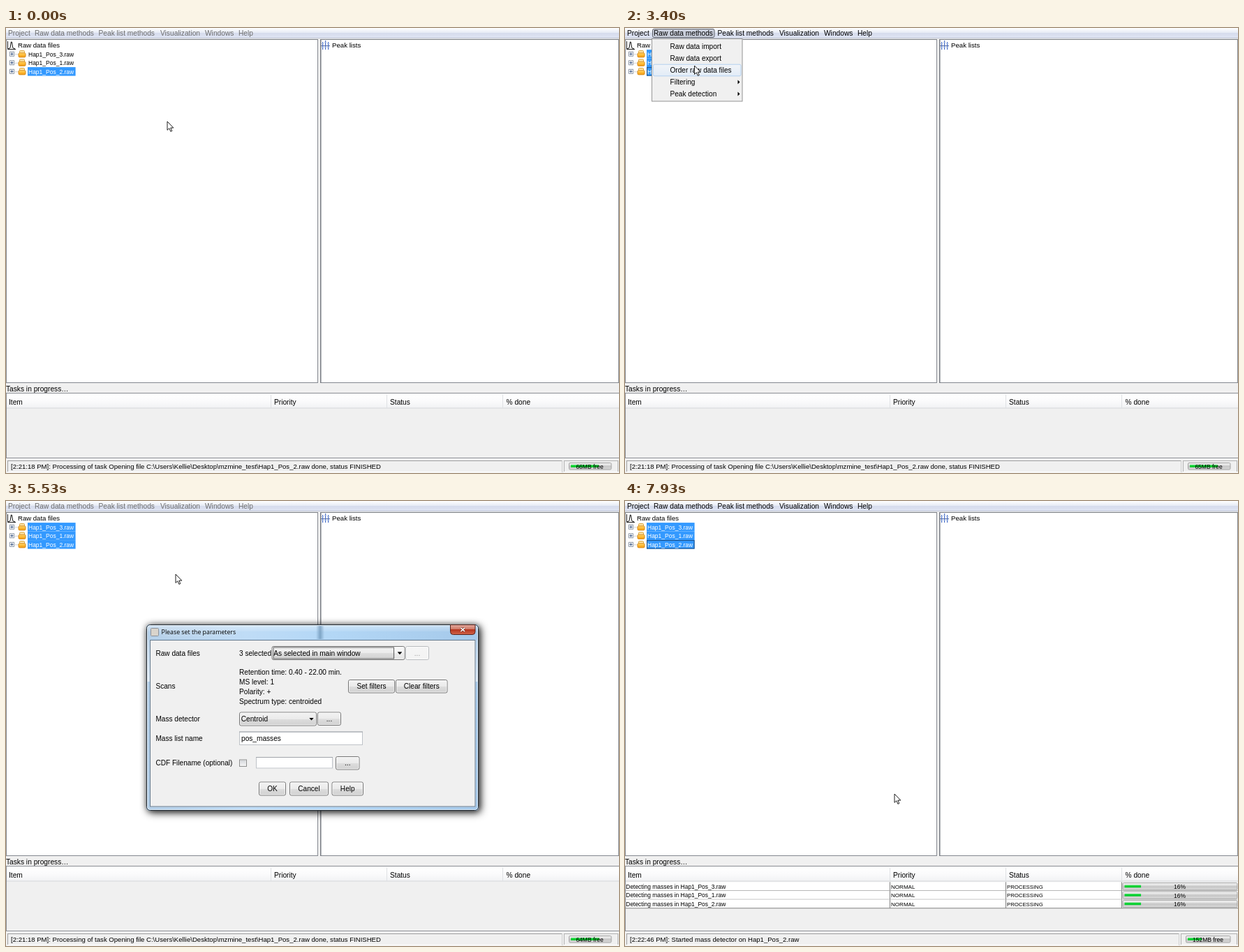
Recreate the animation shown at these times as an HTML page with a canvas. Size 878x638 px, loop 8000 ms.

```html
<!DOCTYPE html>
<html lang="en">
<head>
<meta charset="utf-8">
<title>Mass detection walkthrough</title>
<style>
html, body { margin: 0; width: 100%; height: 100%; overflow: hidden; background: #f0f0f0; }
canvas { display: block; }
</style>
</head>
<body>
<canvas id="stage" width="878" height="638"></canvas>
<script>
const W = 878, H = 638, LOOP = 8000;
const stage = document.getElementById('stage').getContext('2d');
const layer = Object.assign(document.createElement('canvas'), { width: W, height: H });
const layerCtx = layer.getContext('2d');
let c = stage;

const ARIAL = '"Liberation Sans", Arial, sans-serif';
const UI = '"Open Sans", "Noto Sans", sans-serif';
const BIG = 10.2, MID = 9.57, SMALL = 8.5;

// ---------- helpers ----------
function text(s, x, mid, size = BIG, color = '#000', align = 'left', face = ARIAL) {
  c.font = size + 'px ' + face;
  c.textAlign = align;
  c.fillStyle = color;
  c.fillText(s, x, mid + size * 0.355);
}
function box(x, y, x2, y2, color) {
  c.fillStyle = color;
  c.fillRect(x, y, x2 - x, y2 - y);
}
function frame(x, y, x2, y2, color, width = 1) {
  c.strokeStyle = color;
  c.lineWidth = width;
  c.strokeRect(x + 0.5, y + 0.5, x2 - x - 1, y2 - y - 1);
}
function round(x, y, x2, y2, r, fill, stroke) {
  c.beginPath();
  c.roundRect(x, y, x2 - x, y2 - y, r);
  if (fill) { c.fillStyle = fill; c.fill(); }
  if (stroke) { c.strokeStyle = stroke; c.lineWidth = 1; c.stroke(); }
}
function path(points, fill, stroke, width = 1) {
  c.beginPath();
  points.forEach(([x, y]) => c.lineTo(x, y));
  if (fill) { c.closePath(); c.fillStyle = fill; c.fill(); }
  if (stroke) { c.strokeStyle = stroke; c.lineWidth = width; c.stroke(); }
}
function ramp(g, stops) {
  stops.forEach(([at, color]) => g.addColorStop(at, color));
  return g;
}
const shade = (y, y2, ...stops) => ramp(c.createLinearGradient(0, y, 0, y2), stops);
const across = (x, x2, ...stops) => ramp(c.createLinearGradient(x, 0, x2, 0), stops);

// last entry whose time has come
function latest(list, t) {
  return list.filter(e => e[0] <= t).pop()[1];
}

// ---------- timeline ----------
const ACTIVATE = 1000, SELECT_ALL = 1470, MENU = 2130, SUBMENU = 4070,
      CLOSE_MENU = 4870, DIALOG = 4930, PRESS = 7270, RUN = 7330;

const TRAIL = [
  [0, 231, 134], [70, 222, 127], [670, 86, 40], [1000, 86, 38], [1330, 82, 55],
  [1470, 82, 57], [1670, 82, 57], [2000, 84, 7], [2600, 84, 7], [2670, 118, 8],
  [2800, 118, 8], [3200, 105, 36], [3600, 94, 72], [3730, 94, 72], [4000, 90, 87],
  [4270, 90, 87], [4400, 136, 92], [4730, 229, 93], [5270, 229, 93], [5530, 243, 105],
  [5800, 470, 195], [6130, 770, 306], [6400, 610, 326], [6540, 425, 313],
  [6670, 402, 368], [6870, 386, 413], [7870, 386, 413], [7930, 386, 420], [8100, 386, 420]
];
function pointer(t) {
  const i = TRAIL.findIndex(k => k[0] > t);
  const [t0, x0, y0] = TRAIL[i - 1], [t1, x1, y1] = TRAIL[i];
  const k = (t - t0) / (t1 - t0);
  return { x: x0 + (x1 - x0) * k, y: y0 + (y1 - y0) * k };
}

// ---------- main window ----------
const MENUS = [['Project', 3], ['Raw data methods', 41], ['Peak list methods', 132.5],
               ['Visualization', 221], ['Windows', 285], ['Help', 333]];

function menuBar(t, active, p) {
  box(0, 0, W, 15, shade(0, 15, [0, '#fff'], [0.45, '#e6ebf5'], [0.5, '#d6dced'], [1, '#e0e5f4']));
  box(0, 14, W, 15, '#bcc2d0');
  const open = t >= MENU && t < CLOSE_MENU;
  if (open) round(39.5, 1.5, 128, 13.5, 2, '#c9cedb', '#5d6068');
  else if (active && p.y < 14 && p.x > 39 && p.x < 128) round(39.5, 1.5, 128, 13.5, 2, '#eceff7', '#9a9ea8');
  MENUS.forEach(([s, x]) => text(s, x, 7.4, BIG, active ? '#000' : '#6d6d6d'));
}

function folder(y) {
  frame(5, y - 3.5, 12, y + 3.5, '#8f99a8');
  box(6.5, y - 0.5, 10.5, y + 0.5, '#33507f');
  box(8, y - 2, 9, y + 2, '#33507f');
  for (let x = 13; x < 18; x += 2) box(x, y, x + 1, y + 1, '#a8a8a8');
  round(19.5, y - 4.8, 26.5, y, 1, '#fbe3a6', '#d9a441');
  round(18, y - 1.5, 28, y + 4.6, 1.5, shade(y - 2, y + 5, [0, '#ffe08a'], [0.4, '#ffc03c'], [1, '#f0960f']), '#d98c1a');
}

function tree(t, active) {
  box(0, 16, 447, 509, '#fff');
  frame(0, 16, 447, 509, '#84888f');
  box(450, 16, W, 509, '#fff');
  frame(450, 16, W, 509, '#84888f');
  box(450, 16, 451.5, 509, '#777b82');
  box(0, 16, W, 17, '#777b82');
  box(447, 16, 450, 17, '#f0f0f0');

  path([[2.5, 19], [2.5, 30.5], [14, 30.5]], null, '#222');
  path([[3, 30], [6, 28.5], [7.3, 20], [8.3, 20], [9.8, 28.5], [13, 30]], null, '#111');
  text('Raw data files', 17, 24.7, MID);

  box(451, 25, 464, 26, '#5a6d9c');
  [453, 457, 461].forEach((x, i) => {
    const top = i === 1 ? 18 : 20;
    box(x, top, x + 1.2, 31, '#4a70c8');
    box(x - 1, top + 2, x + 2.2, top + 3, '#a5bbe4');
    box(x - 1, 27, x + 2.2, 28, '#a5bbe4');
  });
  text('Peak lists', 467, 24.7, MID + 0.1);

  [3, 1, 2].forEach((n, i) => {
    const y = 37.3 + i * 12.5;
    folder(y);
    const on = t >= SELECT_ALL || (t < ACTIVATE ? i === 2 : i === 0);
    const focus = active && on && (t >= SELECT_ALL ? i === 2 : true);
    if (on) box(31, y - 6.2, 99.6, y + 6.3, '#3399ff');
    if (focus) frame(31, y - 6.2, 99.6, y + 6.3, '#1c4f86');
    text(`Hap1_Pos_${n}.raw`, 32, y + 0.3, SMALL, on ? '#fff' : '#000');
  });
}

function bar(x, y, x2, y2, fillTo) {
  round(x + 0.5, y + 0.5, x2 - 0.5, y2 - 0.5, 1.5,
    shade(y, y2, [0, '#f4f4f4'], [0.35, '#e2e2e2'], [0.5, '#c6c6c6'], [1, '#dcdcdc']), '#a3a3a3');
  if (fillTo > x + 3) {
    const m = (y + y2) / 2;
    box(x + 3, m - 2, fillTo, m + 1.7, shade(m - 2, m + 2, [0, '#3fe05a'], [0.5, '#00d02b'], [1, '#16c636']));
  }
}

const COLS = [379, 545, 711];
function taskTable(t) {
  text('Tasks in progress\u2026', 0, 517, BIG);
  box(0, 523, W, 546, shade(524, 545, [0, '#fff'], [0.5, '#fbfbfc'], [1, '#f1f2f4']));
  box(0, 523, W, 524, '#8a8d93');
  box(0, 544.5, W, 545.5, '#d5d7da');
  COLS.forEach(x => box(x, 525, x + 1, 545, '#dfe1e4'));
  box(0, 546, W, 617, '#f0f0f0');
  [['Item', 4], ['Priority', 384], ['Status', 550], ['% done', 716.5]]
    .forEach(([s, x]) => text(s, x, 536.3, BIG));

  if (t >= RUN) {
    const pct = latest([[RUN, 0], [7600, 5], [7670, 10], [7930, 16]], t);
    [3, 1, 2].forEach((n, i) => {
      const y = 546.3 + i * 12.5;
      box(1, y, W, y + 12.5, '#fff');
      box(0, y + 12, W, y + 13, '#808080');
      text(`Detecting masses in Hap1_Pos_${n}.raw`, 1.3, y + 6.7, 8.45);
      text('NORMAL', 381, y + 6.7, 8.05);
      text('PROCESSING', 547, y + 6.7, 7.75);
      bar(712.5, y + 0.6, 877.5, y + 12, 713 + 1.63 * pct);
      text(pct + '%', 794.5, y + 6.7, SMALL, '#000', 'center');
      COLS.forEach(x => box(x, y, x + 1, y + 12.5, '#808080'));
    });
  }
  box(0, 523, 1, 617, '#8a8d93');
  box(0, 616, W, 617, '#8a8d93');
}

function statusBar(t) {
  const run = t >= RUN, edge = run ? 794 : 797;
  box(0, 617, W, 618, '#fafafa');
  frame(2, 620, edge, 637, '#a0a0a0');
  box(2, 636, edge, 637, '#fff');
  box(edge - 1, 620, edge, 637, '#d0d0d0');
  frame(edge + 2, 620, W - 1, 637, '#b4b4b4');
  box(edge + 2, 636, W, 637, '#fff');
  text(run ? '[2:22:46 PM]: Started mass detector on Hap1_Pos_2.raw'
           : '[2:21:18 PM]: Processing of task Opening file C:\\Users\\Kellie\\Desktop\\mzmine_test\\Hap1_Pos_2.raw done, status FINISHED',
    7, 628.6, MID);
  const mb = latest([[0, 66], [400, 65], [4530, 64], [5870, 63], [RUN, 160], [7600, 156], [7670, 152]], t);
  bar(run ? 803 : 806, 623, 867.5, 633.5, run ? 826 : mb > 64 ? 849 : 850);
  text(mb + 'MB free', run ? 835 : 836, 628.8, SMALL, '#000', 'center');
}

// ---------- menus ----------
const STEP = 17.15;
function popup(x, y, x2, y2, items, textX, mid, hot) {
  box(x, y, x2, y2, '#f0f0f0');
  frame(x, y, x2, y2, '#979797');
  items.forEach((s, i) => {
    const m = mid + i * STEP;
    if (i === hot) round(x + 2.5, m - 8.3, x2 - 2.5, m + 8.3, 2,
      shade(m - 8, m + 8, [0, '#f1f4f8'], [1, '#e2ecf7']), '#b3d0ef');
    text(s, textX, m, 10.1);
  });
}
function menus(t, p) {
  const row = y => Math.floor((y - 17.6) / STEP);
  const hot = t >= 4000 ? 4 : p.y > 17 ? row(p.y) : -1;
  popup(38, 15, 168.5, 105.5,
    ['Raw data import', 'Raw data export', 'Order raw data files', 'Filtering', 'Peak detection'], 64.5, 26.2, hot);
  [77.6, 94.6].forEach(y => path([[161.5, y - 3], [164.5, y], [161.5, y + 3]], '#000'));
  if (t < SUBMENU) return;
  popup(163, 83, 387, 225.5,
    ['Mass detection', 'FTMS shoulder peaks filter', 'Chromatogram builder', 'ADAP Chromatogram builder',
     'ADAP3D feature detection (experimental)', 'GridMass - 2D peak detection', 'MS/MS peaklist builder',
     'Targeted peak detection'], 189.3, 95, p.x > 164 ? 0 : -1);
}

// ---------- dialog ----------
const LOOK = {
  plain: ['#f3f3f3', '#ebebeb', '#dddddd', '#cfcfcf', '#757575'],
  hover: ['#eaf6fd', '#d9f0fc', '#bee6fd', '#a7d9f5', '#3c7fb1'],
  off: ['#f5f5f5', '#f4f4f4', '#f4f4f4', '#f3f3f3', '#b8bbbe']
};
function button(x, y, x2, y2, label, look = 'plain') {
  const [a, b, d, e, line] = LOOK[look];
  round(x + 0.5, y + 0.5, x2 - 0.5, y2 - 0.5, 2.2, shade(y, y2, [0, a], [0.5, b], [0.52, d], [1, e]), line);
  round(x + 1.5, y + 1.5, x2 - 1.5, y2 - 1.5, 1.5, null, 'rgba(255,255,255,.65)');
  text(label, (x + x2) / 2, (y + y2) / 2, 10.1, look === 'off' ? '#9a9a9a' : '#000', 'center');
}
function combo(x, y, x2, y2, label, look) {
  button(x, y, x2, y2, '', look);
  text(label, x + 2.8, (y + y2) / 2 + 0.2, 10.15);
  const ax = x2 - 7.5, ay = (y + y2) / 2;
  path([[ax - 3.2, ay - 1.6], [ax + 3.2, ay - 1.6], [ax, ay + 2]], '#000');
}
function field(x, y, x2, y2) {
  box(x, y, x2, y2, '#fff');
  frame(x, y, x2, y2, '#bfc3c8');
  box(x, y, x2, y + 1, '#a0a4aa');
}

function shadow(blur, offset, alpha) {
  c.save();
  c.shadowColor = `rgba(0,0,0,${alpha})`;
  c.shadowBlur = blur;
  c.shadowOffsetX = c.shadowOffsetY = offset;
  round(201, 177, 677, 444, 5, '#9dc0e0');
  c.restore();
}

// q: how far the window still is from its resting state, 1 to 0
function dialog(t, p, q) {
  shadow(12, 3, 0.75);
  shadow(9, 0.5, 0.5);

  round(201, 177, 677, 444, 5, across(201, 677, [0, '#b4cfe8'], [0.3, '#bfdcf6'], [0.55, '#b3d7f6'], [1, '#a5c9ea']));
  box(202, 199, 676, 259, shade(199, 259, [0, 'rgba(255,255,255,.15)'], [1, 'rgba(255,255,255,.6)']));
  box(202, 178, 676, 187, shade(178, 187, [0, 'rgba(255,255,255,.4)'], [1, 'rgba(255,255,255,.08)']));
  round(201, 177, 677, 444, 5, `rgba(150,160,170,${Math.min(0.6, q * 1.1)})`);
  box(444, 179, 456, 198,
    across(444, 456, [0, 'rgba(90,130,165,0)'], [0.5, 'rgba(90,130,165,.6)'], [1, 'rgba(90,130,165,0)']));
  round(201.5, 177.5, 676.5, 443.5, 5, null, '#1f2932');
  round(202.5, 178.5, 675.5, 442.5, 4, null, 'rgba(255,255,255,.6)');

  round(207.5, 182.5, 218.5, 193.5, 1, '#d9d4cc', '#8b9098');
  c.save();
  c.shadowColor = '#fff';
  c.shadowBlur = 8;
  text('Please set the parameters', 222.6, 187.8, 8.8, '#000', 'left', UI);
  c.restore();

  round(636.5, 177.5, 672, 191.5, [0, 0, 4, 4],
    shade(177, 192, [0, '#e6b0a6'], [0.45, '#cf7866'], [0.5, '#b5351f'], [1, '#d4694f']), '#58231c');
  [['#6b2a22', 2.8], ['#fff', 1.6]].forEach(([col, w]) => {
    path([[651.4, 181.8], [657, 187]], null, col, w);
    path([[657, 181.8], [651.4, 187]], null, col, w);
  });

  box(206, 199, 672.5, 438.5, '#f0f0f0');
  frame(206, 199, 672.5, 438.5, '#64798d');

  [['Raw data files', 218.2], ['Scans', 265.7], ['Mass detector', 312.6],
   ['Mass list name', 340.7], ['CDF Filename (optional)', 375.7]].forEach(([s, y]) => text(s, 214.4, y, 10.1));
  text('3 selected', 334, 218.2, 10.1);
  ['Retention time: 0.40 - 22.00 min.', 'MS level: 1', 'Polarity: +', 'Spectrum type: centroided']
    .forEach((s, i) => text(s, 334, 245.3 + i * 14.1, 10.15));

  const over = (x, y, x2, y2) => p.x > x && p.x < x2 && p.y > y && p.y < y2 ? 'hover' : 'plain';
  combo(380.5, 208, 571.5, 228, 'As selected in main window');
  if (t < PRESS) {
    frame(382.5, 209.5, 556, 226.5, '#666');
    box(557, 210, 570, 226, 'rgba(255,255,255,.45)');
    path([[560.8, 216.4], [567.2, 216.4], [564, 220]], '#000');
  }
  button(572, 208, 606, 228, '...', 'off');
  button(490, 256, 557, 275.5, 'Set filters');
  button(558, 256, 632.5, 275.5, 'Clear filters');
  combo(334, 302.5, 445, 322.5, 'Centroid', over(334, 302, 445, 322));
  button(446, 302.5, 480, 322, '...', over(446, 302, 480, 322));
  field(334, 330.5, 511, 350);
  text('pos_masses', 337, 340.8, 10.15);
  frame(334, 370.5, 345, 381, '#8e8f8f');
  box(335.5, 372, 343.5, 379.5, shade(372, 380, [0, '#d5d8dc'], [1, '#f6f6f6']));
  field(358, 367, 468, 383.5);
  button(472, 366, 506.5, 385.5, '...');
  button(362, 402.5, 401, 422.5, 'OK', over(362, 402, 401, 422));
  if (t >= PRESS) {
    round(363.5, 404, 399.5, 421, 1.5, null, '#35b5e6');
    round(362.5, 403, 400.5, 422, 2.2, null, '#25587d');
    c.setLineDash([1, 1]);
    frame(365, 405.5, 398, 419.5, '#45606f');
    c.setLineDash([]);
  }
  button(406, 402.5, 462, 422.5, 'Cancel');
  button(466.5, 402.5, 512, 422.5, 'Help');
}

// window fades in while tilting towards the viewer
function openingDialog(t, p) {
  const q = latest([[DIALOG, 1], [5000, 0.5], [5070, 0.18], [5130, 0]], t);
  if (!q) return dialog(t, p, 0);
  c = layerCtx;
  c.clearRect(0, 0, W, H);
  dialog(t, p, q);
  c = stage;
  const top = 177 + 4 * q, height = 267 - 18 * q;
  c.globalAlpha = 1 - 0.56 * q * q;
  for (let y = 166; y < 456; y++) {
    const f = (y - top) / height, s = 1 - (0.05 + 0.034 * f) * q;
    c.drawImage(layer, 185, 177 + f * 267, 508, 1, 439 - 254 * s, y, 508 * s, 1);
  }
  c.globalAlpha = 1;
}

function cursor({ x, y }) {
  c.lineJoin = 'miter';
  path([[0, 0], [0, 12.4], [2.8, 9.8], [4.9, 14.4], [6.8, 13.5], [4.8, 9.1], [8.8, 9.1], [0, 0]]
    .map(([dx, dy]) => [x + dx, y + dy]), '#fff', '#111', 0.95);
}

function draw(ms) {
  const t = Math.round(Math.floor((ms + 4) * 0.015) / 0.15) * 10;
  const active = t >= ACTIVATE && t < CLOSE_MENU || t >= RUN;
  const p = pointer(t);
  c = stage;
  box(0, 0, W, H, '#f0f0f0');
  menuBar(t, active, p);
  tree(t, active);
  taskTable(t);
  statusBar(t);
  if (t >= MENU && t < CLOSE_MENU) menus(t, p);
  if (t >= DIALOG && t < RUN) openingDialog(t, p);
  cursor(p);
}

const start = performance.now();
function tick() {
  draw((performance.now() - start) % LOOP);
  requestAnimationFrame(tick);
}
tick();
</script>
</body>
</html>
```
